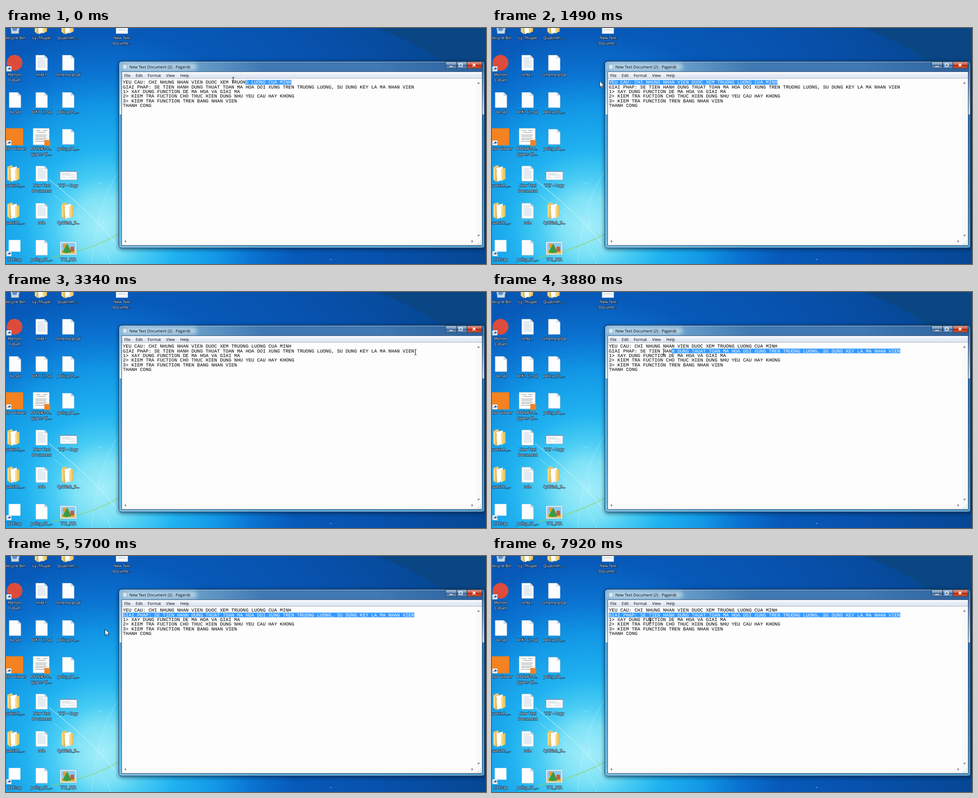
Recreate the animation shown at these times as an HTML page. Size 1064x526 px, loop 8000 ms.

```html
<!DOCTYPE html>
<html lang="vi">
<head>
<meta charset="utf-8">
<title>Desktop</title>
<style>
html, body { margin: 0; width: 100%; height: 100%; overflow: hidden; background: #0a55a6; }
svg { display: block; }
text { font: 8.8px "Open Sans", "Noto Sans", sans-serif; white-space: pre; text-rendering: geometricPrecision; }
.label { font-weight: 500; fill: #fff; text-anchor: middle; paint-order: stroke; stroke: rgba(0, 14, 40, .7); stroke-width: 1.8px; }
.note { font: 10.553px "Liberation Mono", monospace; }
</style>
</head>
<body>
<svg id="stage" width="1064" height="526" viewBox="0 0 1064 526">
  <defs>
    <radialGradient id="sky" gradientUnits="userSpaceOnUse" cx="215" cy="440" r="900">
      <stop offset="0" stop-color="#a4eefa"/><stop offset=".07" stop-color="#7fe2f6"/>
      <stop offset=".12" stop-color="#48ccf4"/><stop offset=".19" stop-color="#20b2f0"/>
      <stop offset=".29" stop-color="#1298e6"/><stop offset=".38" stop-color="#0a72d0"/>
      <stop offset=".48" stop-color="#0759b8"/><stop offset=".68" stop-color="#0751ac"/>
      <stop offset="1" stop-color="#06458e"/>
    </radialGradient>
    <linearGradient id="glass">
      <stop offset="0" stop-color="#83b4d8"/><stop offset=".2" stop-color="#6b9fca"/>
      <stop offset=".4" stop-color="#3f78b2"/><stop offset=".7" stop-color="#4079b4"/><stop offset="1" stop-color="#2d619c"/>
    </linearGradient>
    <linearGradient id="side" x2="0" y2="1">
      <stop offset="0" stop-color="#fff" stop-opacity=".1"/><stop offset=".24" stop-color="#fff" stop-opacity=".75"/>
      <stop offset=".245" stop-color="#0a78c4" stop-opacity=".45"/><stop offset="1" stop-color="#58c0ec" stop-opacity=".6"/>
    </linearGradient>
    <linearGradient id="menu" x2="0" y2="1">
      <stop offset="0" stop-color="#fbfcfe"/><stop offset=".5" stop-color="#e6ebf5"/><stop offset="1" stop-color="#d9e0ef"/>
    </linearGradient>
    <linearGradient id="red" x2="0" y2="1">
      <stop offset="0" stop-color="#dd9a8c"/><stop offset=".48" stop-color="#cc5d46"/>
      <stop offset=".5" stop-color="#b32a12"/><stop offset="1" stop-color="#cf5a36"/>
    </linearGradient>
    <linearGradient id="button" x2="0" y2="1">
      <stop offset="0" stop-color="#a9c2dc"/><stop offset=".48" stop-color="#7396bd"/>
      <stop offset=".5" stop-color="#3e6797"/><stop offset="1" stop-color="#6b97c3"/>
    </linearGradient>
    <linearGradient id="yellow">
      <stop offset="0" stop-color="#f8e6a0"/><stop offset="1" stop-color="#e2b850"/>
    </linearGradient>
    <filter id="blur" x="-20%" y="-60%" width="140%" height="220%"><feGaussianBlur stdDeviation="4"/></filter>
  </defs>

  <rect width="1064" height="526" fill="url(#sky)"/>
  <path d="M822 0Q905 30 975 80H1064V0z" fill="#0a4684"/>
  <g fill="none" stroke="#d9f5fc" opacity=".65">
    <path d="M96 338C160 390 215 440 252 492" stroke-width="1.2"/>
    <path d="M105 372C165 415 200 450 232 526" stroke-width=".8"/>
    <path d="M190 526C198 440 215 370 251 318" stroke-width=".7"/>
  </g>
  <path d="M100 512Q190 494 252 458" fill="none" stroke="#8fd04c" stroke-width="1.2"/>
  <g fill="#fff" opacity=".8">
    <circle cx="160" cy="405" r=".9"/><circle cx="208" cy="347" r="1"/><circle cx="216" cy="432" r=".9"/>
    <circle cx="186" cy="372" r=".7"/><circle cx="720" cy="516" r="1"/>
  </g>
  <g id="icons"></g>

  <rect x="249" y="75" width="814" height="419" rx="7" fill="#001a3c" opacity=".6" filter="url(#blur)"/>
  <rect x="250.5" y="74.5" width="810" height="415.5" rx="6" fill="url(#glass)" stroke="#10263f"/>
  <rect x="251.5" y="75.5" width="808" height="413.5" rx="5" fill="none" stroke="#d5ecf8" stroke-opacity=".75"/>
  <path d="M252 98h5v391h-5zM1056 98h4v391h-4z" fill="url(#side)"/>
  <rect x="257" y="485" width="799" height="4" fill="#6cc0ea" opacity=".55"/>
  <rect x="257" y="79" width="166" height="15" rx="7" fill="#d9e9f4" opacity=".65" filter="url(#blur)"/>
  <rect x="259" y="81" width="9" height="11" fill="#d4e8f3" stroke="#6f8ba3" stroke-width=".7"/>
  <text x="273.5" y="89.5">New Text Document (2) - Pagenib</text>
  <g stroke="#1d3450" stroke-width=".9">
    <path d="M974.5 75h24.5v15h-21q-3.500 0-3.500-4zM999 75h23v15h-23z" fill="url(#button)"/>
    <path d="M1022 75h33v11q0 4-4 4h-29z" fill="url(#red)"/>
  </g>
  <path d="M982 84.500h9v2.500h-9z" fill="#fff" stroke="#34485e" stroke-width=".6"/>
  <rect x="1004.500" y="80" width="7" height="5.500" fill="none" stroke="#fff" stroke-width="1.600"/>
  <path d="M1034.500 79.500l6 6m0-6l-6 6" stroke="#fff" stroke-width="2"/>

  <rect x="256.500" y="97.500" width="799" height="387" fill="#fdfdfd" stroke="#36536f"/>
  <rect x="257" y="98" width="798" height="14" fill="url(#menu)"/>
  <path d="M257 112.500h798" stroke="#b6bccc"/>
  <g id="bar"></g>
  <path d="M1042 113h13v371h-13zM257 470h785v14H257z" fill="#fafafa"/>
  <g fill="#777">
    <path d="M1044.500 124l3-3.500 3 3.500zM1044.500 461l3 3.500 3-3.500zM266 472.500l-3.500 3 3.500 3zM1032 472.500l3.500 3-3.500 3z"/>
  </g>
  <path d="M1051 475h1.500m-5 3.500h1.500m2 0h1.500m-8.500 3.500h1.500m2 0h1.500m2 0h1.500" stroke="#a9b0b8" stroke-width="1.500"/>

  <rect id="mark" height="10.300" fill="#39f"/>
  <g id="note"></g>

  <g id="pointer">
    <path d="M-2.500 -6H-.8L0 -5.300 .8 -6H2.500M0 -5.300V5.300M-2.500 6H-.8L0 5.300 .8 6H2.500" fill="none" stroke="#000"/>
    <path d="M-8 0l4-4v3h8v-3l4 4-4 4V1h-8v3z" fill="#fff" stroke="#000" stroke-width=".9"/>
    <path d="M0 0v14l3.300-3 2.200 5 2.300-1-2.200-4.800H10z" fill="#fff" stroke="#000" stroke-width=".9"/>
  </g>
</svg>
<script>
const $ = id => document.getElementById(id);

// Desktop icons, each drawn around its own centre
const page = '<path d="M-13-17H6l7 7V17h-26z" fill="#fcfdfe" stroke="#a9bccd" stroke-width=".8"/><path d="M6-17v7h7z" fill="#d7e1ea" stroke="#a9bccd" stroke-width=".6"/>';
const lines = '<path d="M-9-11H4M-9-8H4M-9-5H9M-9-2H9M-9 1H9M-9 4H9M-9 7H9M-9 10H9" stroke="#a9c3d6" stroke-width=".9"/>';
const arrow = '<path d="M-18 8h11v11h-11z" fill="#f4f8fc" stroke="#8aa2b8" stroke-width=".6"/><path d="M-15.500 17q0-5 4-5.500V9.500l3.500 3.500-3.500 3v-2q-2.500 0-4 3z" fill="#1c5ba8"/>';
const art = {
  page,
  text: page + lines,
  folder: '<path d="M-15-15l9-4 3 2v31l-6 4-6-5z" fill="#e8c766"/><path d="M-10-12L6-16V13L-6 18z" fill="#fdfdfb" stroke="#b9c2c8" stroke-width=".5"/><path d="M2-10l10-3v25L2 17z" fill="url(#yellow)"/><path d="M-15-15l7 5v28l-7-5z" fill="url(#yellow)" stroke="#c79d3c" stroke-width=".5"/>',
  bin: '<path d="M-12-16H12L8 17H-8z" fill="#c9d8e4" stroke="#7f98ae"/><path d="M-7 3l6-5 7 6-3 7h-8z" fill="#5b8fc4"/>',
  round: '<circle r="17.500" fill="#dc4b3c"/>' + arrow,
  orange: '<rect x="-19" y="-19" width="38" height="38" fill="#f58220"/>' + arrow,
  white: '<rect x="-13" y="-17" width="26" height="26" fill="#fff"/>' + arrow,
  scan: '<path d="M-18-19h36v37h-36z" fill="#fbfbfb" stroke="#9eb0bf" stroke-width=".7"/><path d="M-12-14H-2M3-14H13M-9-10H10M-13-4H13M-13-1H11M-13 3H13M-13 6H8M-13 10H12" stroke="#777" stroke-width=".8"/><rect x="7" y="7" width="13" height="13" fill="#f58220"/>',
  shot: '<path d="M-18-6h37v20h-37z" fill="#fafcfd" stroke="#8ba3b5" stroke-width=".7"/><path d="M-18-5h37" stroke="#5a8fc4" stroke-width="2"/><path d="M-15 0h20M-15 3h28M-15 8h9M2 8h13" stroke="#b4c4d0"/>',
  photo: '<path d="M-18-13h36v29h-36z" fill="#fff" stroke="#8ba3b5" stroke-width=".7"/><path d="M-16-11h32v25h-32z" fill="#8ccaf0"/><path d="M-16 5h32v9h-32z" fill="#d8c06c"/><circle cx="-7" cy="-4" r="5" fill="#e69a32"/><path d="M-13 10L-2-9 7 10q-10 4-20 0z" fill="#3e9a3c"/><path d="M5-2h8V9H5z" fill="#c95a3e"/>'
};
const desktop = [
  [20, 25, 'bin', 'Recycle Bin'], [79, 25, 'folder', 'Ly_Thuyet'], [138, 25, 'folder', 'Quatrinh_...'], [257, 25, 'text', 'New Text|Docume...'],
  [19, 107, 'round', 'Merlon|Cobalt'], [79, 107, 'text', 'linbt1'], [138, 107, 'page', 'schema.plsql'],
  [20, 190, 'page', 'da.sql'], [79, 190, 'page', 'bt#1 (1).sql'], [138, 190, 'page', 'policy_05_...'],
  [19, 272, 'orange', 'Palvo Viewer'], [78, 272, 'scan', 'BTVN#1-P...|quyen-QL...'], [138, 272, 'page', 'policy_08_...'],
  [18, 354, 'folder', 'Quatrinh_...'], [79, 354, 'text', 'New Text|Document'], [138, 354, 'shot', 'YC7 - Copy'],
  [18, 437, 'folder', 'Quatrinh_...'], [79, 437, 'text', 'role'], [138, 437, 'folder', 'QuTrinh_B...'],
  [19, 519, 'white', 'LICEcap'], [79, 519, 'page', 'policy_07_...'], [138, 519, 'photo', 'YC1_BT2']
];
$('icons').innerHTML = desktop.map(([x, y, kind, name]) =>
  `<g transform="translate(${x} ${y - 29.5})">${art[kind]}</g>` +
  name.split('|').map((s, i) => `<text class="label" x="${x}" y="${y + 12 * i}">${s}</text>`).join('')).join('');

$('bar').innerHTML = [['File', 262], ['Edit', 287.5], ['Format', 314], ['View', 355], ['Help', 386.5]]
  .map(([s, x]) => `<text x="${x}" y="109">${s}</text>`).join('');

const left = 259, charW = 6.333, lineH = 10.3;
const note = [
  'YEU CAU: CHI NHUNG NHAN VIEN DUOC XEM TRUONG LUONG CUA MINH',
  'GIAI PHAP: SE TIEN HANH DUNG THUAT TOAN MA HOA DOI XUNG TREN TRUONG LUONG, SU DUNG KEY LA MA NHAN VIEN',
  '1> XAY DUNG FUNCTION DE MA HOA VA GIAI MA',
  '2> KIEM TRA FUCTION CHO THUC HIEN DUNG NHU YEU CAU HAY KHONG',
  '3> KIEM TRA FUNCTION TREN BANG NHAN VIEN',
  'THANH CONG'
];
$('note').innerHTML = note.map((s, i) =>
  `<text class="note" x="${left}" y="${124.3 + lineH * i}"><tspan></tspan><tspan fill="#fff"></tspan></text>`).join('');
const rows = [...$('note').children];

// The screen refreshes in bursts: [first, last, count]
const ticks = [0].concat(...[
  [120, 510, 4], [660, 1060, 4], [1210, 2240, 9], [2380, 3340, 8], [3460, 3880, 4], [4040, 4460, 4],
  [4580, 4820, 3], [4970, 5130, 2], [5580, 6490, 8], [6630, 7540, 8], [7680, 7920, 3]
].map(([a, b, n]) => Array.from({ length: n }, (_, i) => Math.round(a + (b - a) * i / (n - 1)))));

// Pointer keys: [time, x, y]
const path = [
  [0, 503, 115.5], [510, 284, 126], [800, 263, 130], [1060, 262, 128], [1340, 251, 125], [1470, 238, 118],
  [1730, 300, 101], [2000, 360, 120], [2240, 407, 132], [2380, 865, 139], [2780, 960, 136], [3340, 907, 134],
  [3460, 850, 136], [3880, 380, 133], [4180, 264, 138], [4460, 263, 142], [4700, 264, 135], [4820, 251, 129],
  [4970, 234, 148], [5130, 217, 162], [5580, 219, 163], [5800, 278, 205], [6100, 390, 180], [6300, 409, 134],
  [6490, 408, 148], [6630, 402, 153], [7000, 330, 150], [7300, 264, 133], [7540, 264, 139], [7680, 268, 140],
  [7920, 350, 144]
];
// First selected column on each of the two lines: [time, column]
const picks = [
  [[0, 43], [510, 4], [660, 0]],
  [[3340, 102], [3460, 95], [3880, 22], [4180, 0]]
];

function at(keys, t) {
  const i = keys.findIndex(k => k[0] > t);
  if (i < 0) return keys[keys.length - 1].slice(1);
  if (!i) return keys[0].slice(1);
  const a = keys[i - 1], b = keys[i], f = (t - a[0]) / (b[0] - a[0]);
  return a.slice(1).map((v, j) => v + (b[j + 1] - v) * f);
}

function draw(t) {
  const line = t < 3340 ? 0 : 1, from = Math.round(at(picks[line], t)[0]);
  rows.forEach((row, i) => {
    const cut = i === line ? from : note[i].length;
    row.children[0].textContent = note[i].slice(0, cut);
    row.children[1].textContent = note[i].slice(cut);
  });
  $('mark').setAttribute('x', left + from * charW);
  $('mark').setAttribute('y', 115.9 + lineH * line);
  $('mark').setAttribute('width', (note[line].length - from) * charW);

  const [x, y] = at(path, t);
  const shape = x < 247 || y < 112 ? 2 : x < 256 ? 1 : 0;
  [...$('pointer').children].forEach((p, i) => p.style.display = i === shape ? '' : 'none');
  $('pointer').setAttribute('transform', `translate(${Math.round(x) + .5} ${Math.round(y)})`);
}

let last = -1;
function frame() {
  const now = performance.now() % 8000;
  const t = ticks.filter(k => k <= now).pop();
  if (t !== last) draw(last = t);
  requestAnimationFrame(frame);
}
frame();
</script>
</body>
</html>
```
